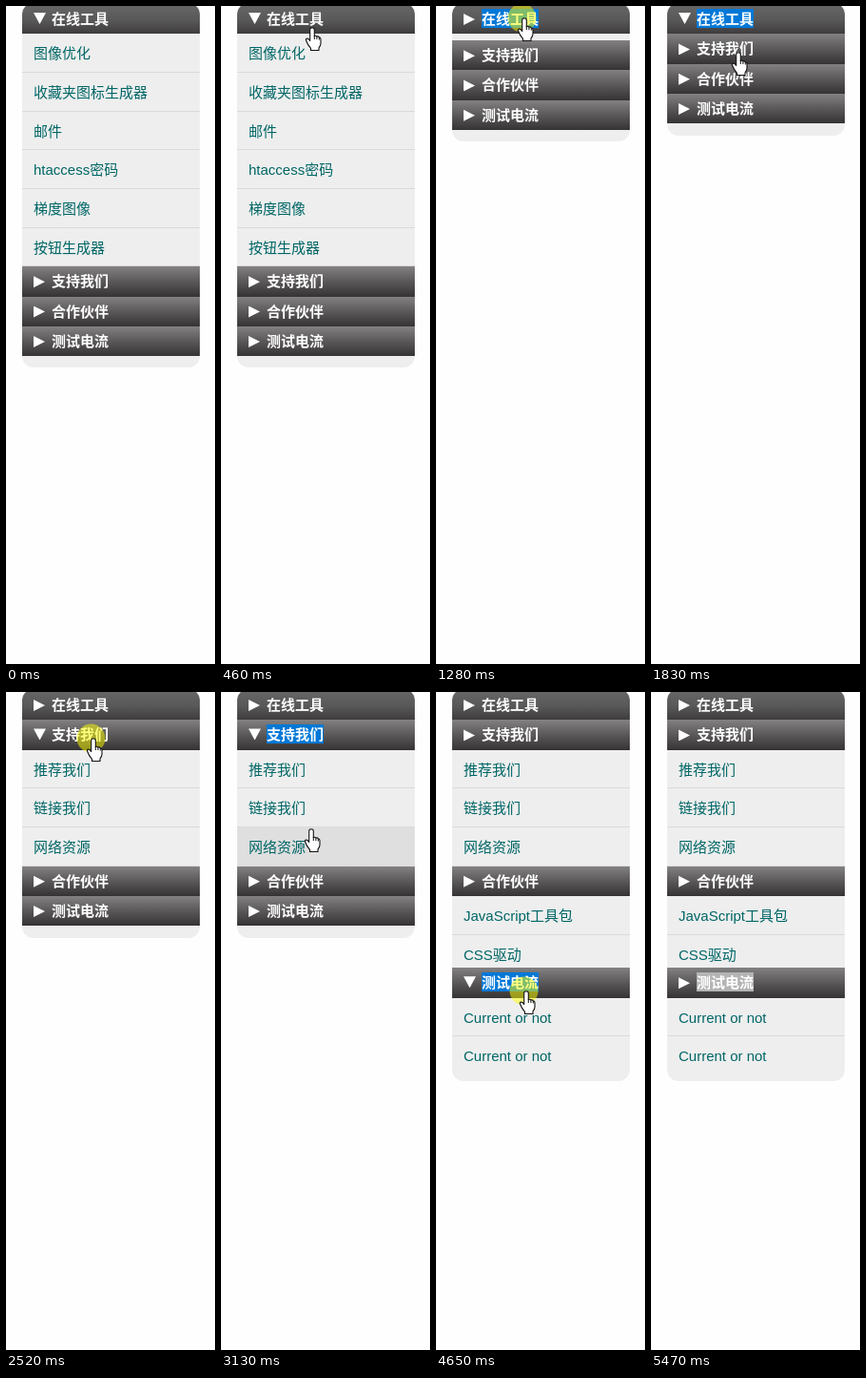
An HTML page for the animation above (5540 ms loop, 220 by 690 pixels).

```html
<!DOCTYPE html>
<html lang="zh">
<head>
<meta charset="utf-8">
<title>Accordion menu</title>
<style>
html, body { margin: 0; width: 100%; height: 100%; overflow: hidden; background: #fefefe; }
#menu {
  position: absolute; left: 17px; top: -1.9px; width: 187px;
  padding-bottom: 12.3px; overflow: hidden; background: #eee;
  border-radius: 10px 10px 12px 12px;
  font: 15px "Liberation Sans", "Noto Sans CJK SC", "Noto Sans CJK", sans-serif;
  white-space: nowrap; cursor: default;
}
.head {
  position: relative; height: 31.3px; line-height: 31px; padding-left: 31px;
  color: #fff; font-weight: bold;
  background: linear-gradient(#838181, #5a5858 50%, #363334);
}
.head:first-child { background: linear-gradient(#686767, #595858 55%, #3e3c3d); }
.head::before {
  content: ""; position: absolute; left: 12px; top: 10px; width: 12px; height: 12px;
  background: #fff; clip-path: polygon(0 0, 100% 50%, 0 100%);
}
.head.open::before { top: 9px; width: 13px; clip-path: polygon(0 0, 100% 0, 50% 100%); }
.head span { position: relative; z-index: 0; display: inline-block; }
.head span::before {
  content: ""; position: absolute; z-index: -1; left: 0; right: 0; top: 5px;
  height: 20px; background: var(--mark, transparent);
}
.body { overflow: hidden; }
.row {
  height: 40.65px; line-height: 42px; padding-left: 12px; box-sizing: border-box;
  color: #066; border-bottom: 1px solid #dadada;
}
.row.hover { background: #dfdfdf; }
svg { position: absolute; left: 0; top: 0; pointer-events: none; }
</style>
</head>
<body>
<div id="menu"></div>
<svg width="220" height="690">
  <g id="pointer">
    <circle id="press" cx="-2.5" cy="-.5" r="15" fill="#ff0" fill-opacity=".5"/>
    <path fill="#fff" stroke="#111" stroke-width="1.1" stroke-linejoin="round"
      d="M-2.3 2a2.3 2.3 0 0 1 4.6 0v6.5q1.8-.8 2.6.5q1.8-.5 2.4.8q1.7.2 1.7 2v4.5q0 2.5-2 4.5v2.7h-8.5v-2.2q-3.5-4-5-8.3q-.4-2 1.2-2q1.8.2 3 2.5z"/>
    <path fill="none" stroke="#111" d="M2.3 8v4M4.9 9v3M7.3 10v2.5"/>
  </g>
</svg>
<script>
const LOOP = 5540, START = 110, STEP = 68.72;
const ROW = 40.65, SHORT = 75.3;

// open / mark: [from, to] spans in ms; height: open height of the panel at time t
const sections = [
  {
    title: '在线工具',
    rows: ['图像优化', '收藏夹图标生成器', '邮件', 'htaccess密码', '梯度图像', '按钮生成器'],
    open: [[0, 800], [1350, 1900]], mark: [1280, 1900],
    height: t => t < 1350 ? 6 * ROW * (1 - swing(t, 811, 1343)) : 0
  },
  {
    title: '支持我们',
    rows: ['推荐我们', '链接我们', '网络资源'],
    open: [[1900, 2590], [2860, 3410]], mark: [2790, 3410],
    height: t => t < 2240 ? SHORT * swing(t, 1890, 2170) : 3 * ROW
  },
  {
    title: '合作伙伴',
    rows: ['JavaScript工具包', 'CSS驱动'],
    open: [[3410, 3620]], mark: [3550, 4290],
    height: t => SHORT * swing(t, 3410, 3694)
  },
  {
    title: '测试电流',
    rows: ['Current or not', 'Current or not'],
    open: [[4300, 4710]], mark: [4640, LOOP],
    height: t => SHORT * swing(t, 4310, 4640)
  }
];

const presses = [
  [730, 800], [1280, 1350], [1890, 1960], [2520, 2590], [2790, 2860],
  [3410, 3480], [3550, 3620], [4300, 4370], [4640, 4710]
];

// pointer moves: from, to, target x, target y
const moves = [
  [110, 520, 93, 13], [1570, 1800, 92, 49], [2800, 3340, 96, 184],
  [4110, 4300, 95, 314], [4715, 4925, 208, 577]
];
const origin = [150, 216];

const within = (t, [from, to]) => t >= from && t < to;

function swing(t, from, to) {
  const k = Math.min(1, Math.max(0, (t - from) / (to - from)));
  return 0.5 - Math.cos(k * Math.PI) / 2;
}

function add(parent, tag, className, text = '') {
  const el = document.createElement(tag);
  el.className = className;
  el.textContent = text;
  return parent.appendChild(el);
}

const menu = document.getElementById('menu');
const pointer = document.getElementById('pointer');
const press = document.getElementById('press');

for (const s of sections) {
  s.head = add(menu, 'div', 'head');
  s.label = add(s.head, 'span', 'label', s.title);
  s.body = add(menu, 'div', 'body');
  s.rows.forEach(text => add(s.body, 'div', 'row', text));
}

function pointerAt(t) {
  let [x, y] = origin;
  for (const [from, to, toX, toY] of moves) {
    const k = swing(t, from, to);
    x += (toX - x) * k;
    y += (toY - y) * k;
  }
  return [Math.round(x), Math.round(y)];
}

let hovered = null;

function draw(time) {
  // the picture advances in even steps
  const t = time < START ? 0 : START + 8 + STEP * Math.floor((time - START + 5) / STEP);

  for (const s of sections) {
    s.head.classList.toggle('open', s.open.some(span => within(t, span)));
    s.body.style.height = s.height(t) + 'px';
    const color = t >= 5470 ? '#b4b4b4' : '#0078d7';
    s.label.style.setProperty('--mark', within(t, s.mark) ? color : 'transparent');
  }

  const visible = within(t, [START, 4985]);
  const [x, y] = pointerAt(t);
  pointer.style.display = visible ? '' : 'none';
  pointer.setAttribute('transform', `translate(${x} ${y})`);
  press.style.display = presses.some(span => within(t, span)) ? '' : 'none';

  const under = visible ? document.elementFromPoint(x, y) : null;
  const row = under && under.closest('.row');
  if (row !== hovered) {
    if (hovered) hovered.classList.remove('hover');
    if (row) row.classList.add('hover');
    hovered = row;
  }
}

const began = performance.now();
function tick() {
  draw((performance.now() - began) % LOOP);
  requestAnimationFrame(tick);
}
tick();
</script>
</body>
</html>
```
